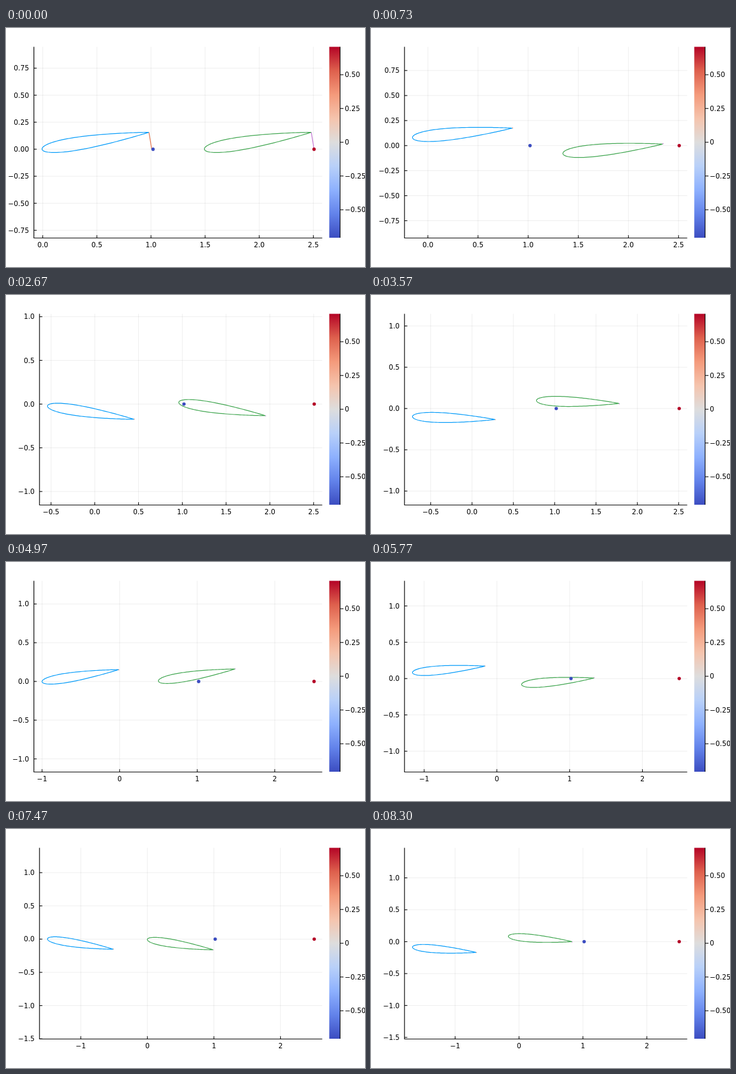
An HTML page with a canvas for the animation above (8330 ms loop, 600 by 400 pixels).

```html
<!DOCTYPE html>
<html lang="en">
<head>
<meta charset="utf-8">
<title>Two flapping foils</title>
<style>
html, body { margin: 0; width: 100%; height: 100%; overflow: hidden; background: #fff; }
canvas { display: block; width: 600px; height: 400px; }
</style>
</head>
<body>
<canvas id="stage" width="600" height="400"></canvas>
<script>
const ctx = document.getElementById('stage').getContext('2d');

const LOOP = 8330, STEPS = 150, DT = 1 / STEPS;
const TOP = 31.5, BOTTOM = 351.5, RIGHT = 528.5;
const MID = (TOP + BOTTOM) / 2;
const FONT = '11.4px "DejaVu Sans", sans-serif';
const HEAVE = 0.1, PITCH = Math.PI / 20;

const FOILS = [
  { x: 0, sign: 1, color: '#009af9', edge: '#e26f46' },
  { x: 1.5, sign: -1, color: '#3da44d', edge: '#c271d2' }
];
const VORTICES = [
  { x: 1.019, color: '#3b4cc0' },
  { x: 2.5067, color: '#b40426' }
];
const COOLWARM = ['#b40426', '#de604d', '#f49a7b', '#f5c4ad', '#dddddd',
                  '#b8d0f9', '#8db0fe', '#6282ea', '#3b4cc0'];

// Symmetric 12% section, from tail over the top to the nose and back below
const SECTION = Array.from({ length: 129 }, (_, i) => {
  const a = i / 64 * Math.PI;
  const x = (1 + Math.cos(a)) / 2;
  const y = 0.6 * (0.2969 * Math.sqrt(x) - 0.126 * x - 0.3516 * x ** 2
                   + 0.2843 * x ** 3 - 0.1036 * x ** 4);
  return [x, i <= 64 ? y : -y];
});

function pose(foil, n) {
  const phase = 2 * Math.PI * n * DT;
  const pitch = PITCH * Math.cos(phase);
  const c = Math.cos(pitch), s = Math.sin(pitch);
  const x0 = foil.x - (n + 1) * DT;
  const y0 = foil.sign * HEAVE * Math.sin(phase);
  return ([x, y]) => [x0 + x * c - y * s, y0 + x * s + y * c];
}

function shapes(n) {
  return FOILS.map(foil => {
    const place = pose(foil, n);
    const last = n ? pose(foil, n - 1)([1, 0]) : [foil.x + 1 + DT, 0];
    return { foil, outline: SECTION.map(place), edge: [place([1, 0]), last] };
  });
}

function view(items) {
  const pts = items.flatMap(i => [...i.outline, ...i.edge]);
  VORTICES.forEach(v => pts.push([v.x, 0]));
  const xs = pts.map(p => p[0]), ys = pts.map(p => p[1]);
  const x0 = Math.min(...xs), x1 = Math.max(...xs);
  const y0 = Math.min(...ys), y1 = Math.max(...ys);
  // The margin widens once a negative tick label has to fit
  const left = y0 - 0.03 * (y1 - y0) < -0.05 ? 56 : 46.6;
  const xMin = x0 - 0.03 * (x1 - x0), xMax = x1 + 0.03 * (x1 - x0);
  const scale = (RIGHT - left) / (xMax - xMin);
  const yMid = (y0 + y1) / 2, half = (BOTTOM - TOP) / 2 / scale;
  return {
    left, xMin, xMax, yMin: yMid - half, yMax: yMid + half,
    X: x => left + (x - xMin) * scale,
    Y: y => MID - (y - yMid) * scale
  };
}

// Largest step that leaves at least four ticks
function ticks(min, max) {
  for (const [step, digits] of [[1, 0], [0.5, 1], [0.25, 2]]) {
    const a = Math.ceil(min / step), b = Math.floor(max / step);
    if (b - a >= 3 || step === 0.25) {
      return Array.from({ length: b - a + 1 }, (_, i) => {
        const v = (a + i) * step;
        return { v, text: label(v, digits) };
      });
    }
  }
}

function label(v, digits) {
  return (v < 0 ? '\u2212' : '') + Math.abs(v).toFixed(digits);
}

function line(pts, color, width) {
  ctx.beginPath();
  pts.forEach(([x, y]) => ctx.lineTo(x, y));
  ctx.strokeStyle = color;
  ctx.lineWidth = width;
  ctx.stroke();
}

function text(str, x, y, align) {
  ctx.fillStyle = '#000';
  ctx.textAlign = align;
  ctx.fillText(str, x, y);
}

function drawAxes(v) {
  const xt = ticks(v.xMin, v.xMax), yt = ticks(v.yMin, v.yMax);
  const grid = 'rgba(0,0,0,0.07)';
  xt.forEach(t => line([[v.X(t.v), TOP], [v.X(t.v), BOTTOM]], grid, 1));
  yt.forEach(t => line([[v.left, v.Y(t.v)], [RIGHT, v.Y(t.v)]], grid, 1));
  line([[v.left, TOP], [v.left, BOTTOM], [RIGHT, BOTTOM]], '#000', 1.2);
  xt.forEach(t => {
    const x = v.X(t.v);
    line([[x, BOTTOM], [x, BOTTOM - 4.7]], '#000', 1.1);
    text(t.text, x, 367.3, 'center');
  });
  yt.forEach(t => {
    const y = v.Y(t.v);
    line([[v.left, y], [v.left + 4.7, y]], '#000', 1.1);
    text(t.text, v.left - 8.2, y + 4.2, 'right');
  });
}

function drawColorbar() {
  const g = ctx.createLinearGradient(0, TOP, 0, BOTTOM);
  COOLWARM.forEach((c, i) => g.addColorStop(i / 8, c));
  ctx.fillStyle = g;
  ctx.fillRect(540.3, TOP, 18, BOTTOM - TOP - 0.5);
  line([[558.4, TOP], [558.4, BOTTOM - 0.5]], '#000', 1.1);
  for (let i = -2; i <= 2; i++) {
    const y = MID - 0.3 - i * 56.5;
    line([[558.4, y], [564, y]], '#000', 1.1);
    text(i ? label(i / 4, 2) : '0', 566.3, y + 4.2, 'left');
  }
}

function draw(n) {
  const items = shapes(n), v = view(items);
  const toPx = ([x, y]) => [v.X(x), v.Y(y)];
  ctx.fillStyle = '#fff';
  ctx.fillRect(0, 0, 600, 400);
  ctx.font = FONT;
  ctx.lineJoin = 'round';
  drawAxes(v);
  items.forEach(({ foil, outline, edge }) => {
    line(outline.map(toPx), foil.color, 1.2);
    line(edge.map(toPx), foil.edge, 1.2);
  });
  VORTICES.forEach(d => {
    ctx.beginPath();
    ctx.arc(v.X(d.x), v.Y(0), 2.8, 0, 2 * Math.PI);
    ctx.fillStyle = d.color;
    ctx.fill();
  });
  drawColorbar();
}

const start = performance.now();
let shown = -1;

function tick(now) {
  const t = Math.max(0, now - start) % LOOP;
  // 30 steps a second, timed in hundredths of a second
  const n = Math.floor((3 * Math.floor(t / 10) + 1) / 10);
  if (n !== shown) draw(shown = n);
  requestAnimationFrame(tick);
}
tick(start);
</script>
</body>
</html>
```
